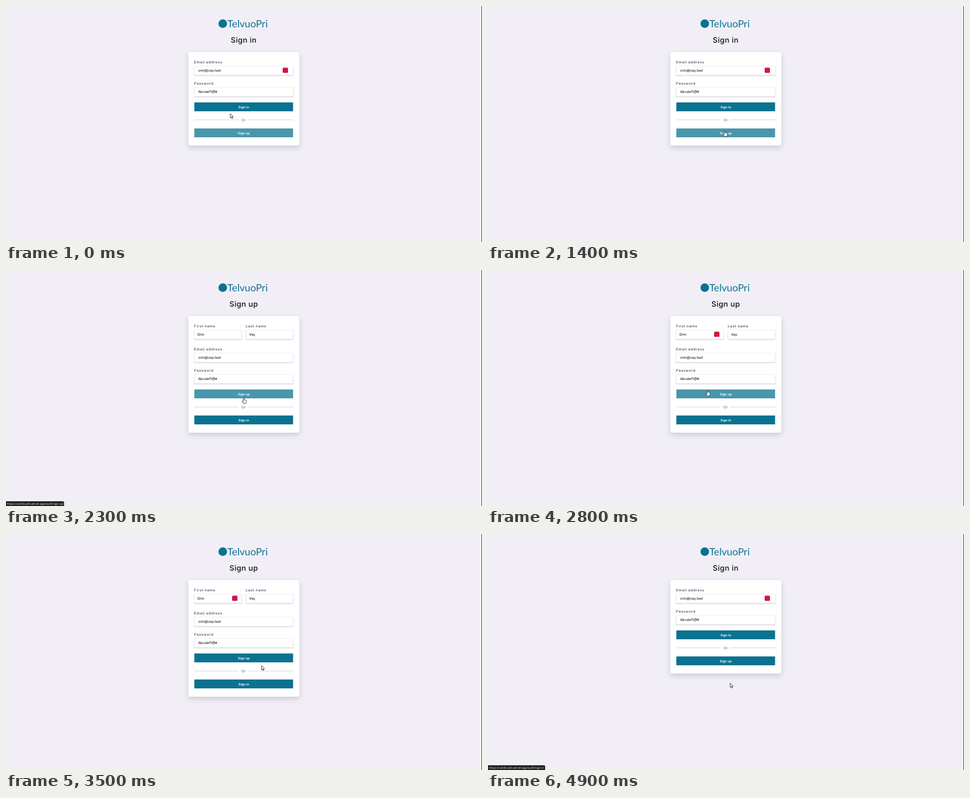
These frames come from a looping animation (800x399 px, 5000 ms). An HTML page with a canvas:

```html
<!DOCTYPE html>
<html lang="en">
<head>
<meta charset="utf-8">
<title>Sign in</title>
<style>
html, body { margin: 0; width: 100%; height: 100%; overflow: hidden; background: #f1eff5; }
canvas { display: block; }
</style>
</head>
<body>
<canvas id="stage" width="800" height="399"></canvas>
<script>
const ctx = document.getElementById('stage').getContext('2d');
const LOOP = 5000, STEP = 100;
const TEAL = '#0b7291', TEAL_LIGHT = '#4a96ad';
const UI = 'Inter, sans-serif';
const PERSON = { first: 'Orin', last: 'Vay', email: 'orin@vay.test' };

// Pointer tip: [time, x, y]
const PATH = [
  [0, 377, 182], [200, 377, 182], [800, 401, 177], [1100, 401, 177],
  [1400, 398, 211], [1500, 397, 217], [1900, 397, 219.5], [2100, 397, 219.5],
  [2200, 398.5, 216.5], [2300, 399.5, 216], [2500, 399.5, 216],
  [3000, 348.5, 194.5], [3200, 352, 198.5], [3500, 429.5, 222.5],
  [3700, 414, 243], [3800, 407, 247], [4400, 407, 252], [5000, 407, 252]
];
const ARROW = new Path2D('M0 0V7.3L1.7 5.8L2.9 8.5L4 8L2.8 5.4L5 5.2Z');
const HAND = new Path2D('M-.8 .8Q0 -.4 .8 .8V3.4Q1.6 2.8 2 3.7Q2.8 3.2 3.2 4.1' +
  'Q4.2 3.8 4.3 4.9V6.6Q4.2 8.3 3.3 9.8H-.3Q-1.3 8.2 -2.6 6.4Q-2.6 5.2 -1.6 5.7L-.8 6.4Z');

function pointerAt(t) {
  const i = PATH.findIndex(p => p[0] > t);
  const [t0, x0, y0] = PATH[i - 1], [t1, x1, y1] = PATH[i];
  const k = (t - t0) / (t1 - t0);
  return { x: x0 + (x1 - x0) * k, y: y0 + (y1 - y0) * k };
}

function text(str, x, y, font, color, { align = 'left', spacing = 0 } = {}) {
  ctx.font = font;
  ctx.fillStyle = color;
  ctx.textAlign = align;
  ctx.letterSpacing = spacing + 'px';
  ctx.fillText(str, x, y);
}

function box(x, y, w, h, r, color) {
  ctx.fillStyle = color;
  ctx.beginPath();
  ctx.roundRect(x, y, w, h, r);
  ctx.fill();
}

function withShadow(color, blur, dy, draw) {
  ctx.save();
  ctx.shadowColor = color;
  ctx.shadowBlur = blur;
  ctx.shadowOffsetY = dy;
  draw();
  ctx.restore();
}

function field(label, value, x, y, w, pad = 7) {
  text(label, x, y - 3.6, '500 6px ' + UI, '#46464c', { spacing: 0.6 });
  withShadow('rgba(80, 70, 130, .25)', 2, 1, () => box(x, y, w, 16, 1, '#e5e2f0'));
  box(x + 0.6, y + 0.6, w - 1.2, 14.8, 0.6, '#fff');
  text(value, x + pad, y + 10, '500 5.8px ' + UI, '#222');
}

const isOver = (p, y) => p.x > 316 && p.x < 483 && p.y >= y && p.y < y + 15;

function button(label, y, lit) {
  box(316.5, y, 166, 15, 0.5, lit ? TEAL_LIGHT : TEAL);
  text(label, 399.6, y + 9.6, '600 5.5px ' + UI, '#fff', { align: 'center' });
}

function divider(y) {
  ctx.fillStyle = '#d9d8e0';
  ctx.fillRect(316.5, y, 74.5, 1);
  ctx.fillRect(407, y, 76, 1);
  text('Or', 399.8, y + 2.6, '400 6px ' + UI, '#666', { align: 'center', spacing: 0.6 });
}

function header(title) {
  ctx.fillStyle = TEAL;
  ctx.beginPath();
  ctx.arc(364.3, 29.8, 7.2, 0, Math.PI * 2);
  ctx.fill();
  text('TelvuoPri', 372, 36, '400 16.8px Lato, sans-serif', TEAL);
  text(title, 399.5, 62, '500 12.6px ' + UI, '#111', { align: 'center', spacing: 0.4 });
}

function card(h) {
  withShadow('rgba(50, 50, 80, .2)', 10, 4, () => box(306.5, 78, 186.5, h, 4, '#fff'));
}

const badge = x => box(x, 104.3, 9, 8.8, 1.6, '#cf1843');

function signInPage(p, t) {
  header('Sign in');
  card(158);
  field('Email address', PERSON.email, 316, 101, 167);
  field('Password', 'Abcdef1@#', 316, 137, 167);
  badge(465);
  button('Sign in', 163, isOver(p, 163));
  divider(192);
  button('Sign up', 207, isOver(p, 207) || t < 300);
  return isOver(p, 163) || isOver(p, 207);
}

function signUpPage(p, t) {
  header('Sign up');
  card(197);
  field('First name', PERSON.first, 316, 101, 80, 5.5);
  field('Last name', PERSON.last, 403, 101, 80, 5.5);
  field('Email address', PERSON.email, 316, 140, 167);
  field('Password', 'Abcdef1@#', 316, 176, 167);
  if (t >= 2700) badge(380);
  button('Sign up', 202, isOver(p, 202));
  divider(231.2);
  button('Sign in', 246, isOver(p, 246));
  return isOver(p, 202) || isOver(p, 246);
}

function statusBar(route, w) {
  box(0, 391, w, 8, [0, 2, 0, 0], '#202023');
  text('https://cardio-phi.vercel.app/auth/' + route, 1.6, 396.7,
    '400 4.85px "Open Sans", sans-serif', '#e8e8ea');
}

function drawPointer(p, hand) {
  ctx.save();
  ctx.translate(p.x, p.y);
  ctx.lineWidth = 0.8;
  ctx.lineJoin = 'round';
  ctx.strokeStyle = '#26262b';
  ctx.fillStyle = '#fff';
  const shape = hand ? HAND : ARROW;
  ctx.fill(shape);
  ctx.stroke(shape);
  ctx.restore();
}

function draw(t) {
  ctx.textRendering = 'geometricPrecision';
  ctx.fillStyle = '#f1eff5';
  ctx.fillRect(0, 0, 800, 399);
  ctx.fillStyle = '#56565c';
  ctx.fillRect(799, 0, 1, 399);

  const p = pointerAt(t);
  const page = t >= 2200 && t < 4900 ? signUpPage : signInPage;
  const hand = page(p, t);
  if (t >= 2100 && t < 2700) statusBar('sign-up', 97.5);
  if (t >= 3900) statusBar('sign-in', 96);
  drawPointer(p, hand);
}

function tick() {
  draw(Math.floor((performance.now() % LOOP) / STEP) * STEP);
  requestAnimationFrame(tick);
}
tick();
</script>
</body>
</html>
```
